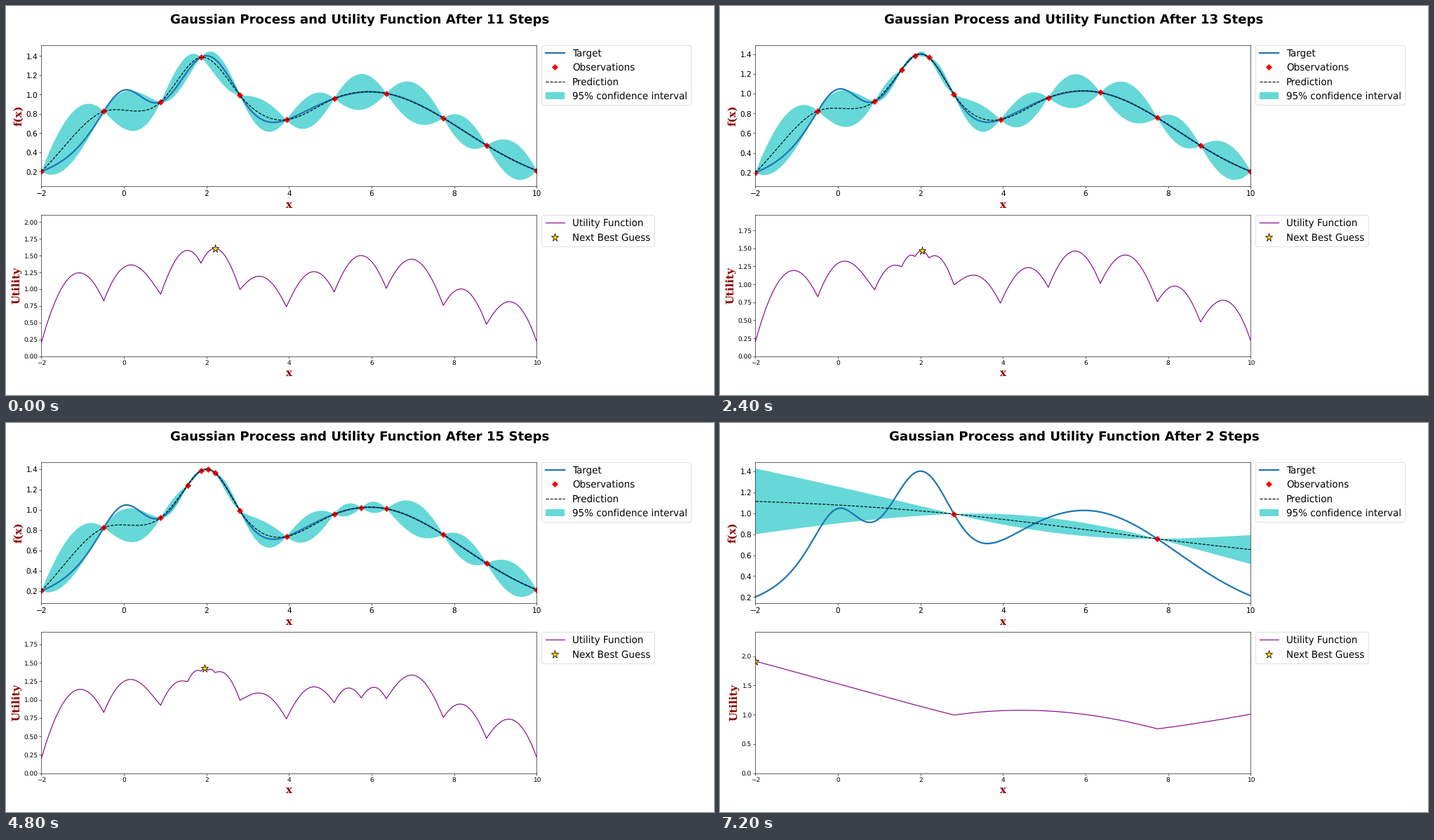
A matplotlib script for the animation above (8 s loop, 1009 px wide and 555 px high).

```python
import numpy as np
import matplotlib.pyplot as plt
from matplotlib.animation import FuncAnimation

WIDTH, HEIGHT, DPI = 1009, 555, 72  # at 72 dpi one point is one pixel
SCALE = 0.753  # pixels per nominal point
KAPPA = 5

plt.rcParams.update({
    "font.family": "DejaVu Sans", "text.hinting": "no_hinting",
    "axes.linewidth": 0.8 * SCALE, "axes.labelpad": 4 * SCALE,
    "lines.linewidth": 1.5 * SCALE, "lines.markeredgewidth": SCALE,
    "patch.linewidth": SCALE, "legend.fontsize": 18 * SCALE,
    "axes.labelsize": 20 * SCALE,
})
for side in ("xtick", "ytick"):
    plt.rcParams.update({f"{side}.major.size": 3.5 * SCALE,
                         f"{side}.major.pad": 3.5 * SCALE,
                         f"{side}.major.width": 0.8 * SCALE})

LABEL_FONT = dict(family="DejaVu Serif", weight="bold", color="darkred")

FIRST = [2.81, 7.737]
EARLY = [-2, -0.488, 0.889, 1.866, 2.81, 3.935, 5.095, 6.356, 7.737, 8.782, 10]
GUESSES = [2.203, 1.544, 2.035, 5.75, 1.96, 2.096]

grid = np.linspace(-2, 10, 2401)


def target(x):
    return np.exp(-(x - 2) ** 2) + np.exp(-(x - 6) ** 2 / 10) + 1 / (x ** 2 + 1)


def matern(a, b, length):
    """Matern kernel with nu = 1.5."""
    r = np.sqrt(3) * np.abs(a[:, None] - b[None, :]) / length
    return (1 + r) * np.exp(-r)


def factor(x, length):
    return np.linalg.cholesky(matern(x, x, length) + 1e-10 * np.eye(len(x)))


def log_likelihood(x, y, length):
    chol = factor(x, length)
    white = np.linalg.solve(chol, y)
    return -0.5 * white @ white - np.log(np.diag(chol)).sum()


def posterior(x, y):
    """Mean and deviation on the grid at the most likely length scale."""
    lengths = np.geomspace(0.5, 60, 1500)
    length = max(lengths, key=lambda s: log_likelihood(x, y, s))
    chol = factor(x, length)
    cross = np.linalg.solve(chol, matern(x, grid, length))
    mean = cross.T @ np.linalg.solve(chol, y)
    return mean, np.sqrt(np.maximum(1 - (cross ** 2).sum(axis=0), 0))


def make_step(points, guess):
    x = np.array(points, dtype=float)
    y = target(x)
    return (x, y, *posterior(x, y), guess)


steps = [make_step(EARLY + GUESSES[:k], guess) for k, guess in enumerate(GUESSES)]
steps.append(make_step(FIRST, -2))

fig = plt.figure(figsize=(WIDTH / DPI, HEIGHT / DPI), dpi=DPI, facecolor="white")


def add_panel(top, bottom, left=50.4, right=756.4):
    return fig.add_axes([left / WIDTH, 1 - bottom / HEIGHT,
                         (right - left) / WIDTH, (bottom - top) / HEIGHT])


top_ax = add_panel(55.8, 257.3)
low_ax = add_panel(298, 499.6)
title = fig.text(0.5, 1 - 25.4 / HEIGHT, "", ha="center", va="baseline",
                 fontsize=24 * SCALE, weight="bold")


def finish(ax, ylabel, tick_size):
    ax.set_xlim(-2, 10)
    ax.set_xlabel("x", fontdict=LABEL_FONT)
    ax.set_ylabel(ylabel, fontdict=LABEL_FONT)
    ax.tick_params(labelsize=tick_size * SCALE)
    ax.legend(loc="upper left", bbox_to_anchor=(1.01, 1), borderaxespad=0)


def draw(frame):
    x, y, mean, dev, guess = steps[frame // 3]
    title.set_text(f"Gaussian Process and Utility Function After {len(x)} Steps")

    top_ax.clear()
    top_ax.plot(grid, target(grid), lw=3 * SCALE, color="tab:blue", label="Target")
    top_ax.plot(x, y, "D", ms=8 * SCALE, color="r", label="Observations")
    top_ax.plot(grid, mean, "--", color="k", label="Prediction")
    top_ax.fill_between(grid, mean - 1.96 * dev, mean + 1.96 * dev, alpha=0.6,
                        fc="c", ec="none", label="95% confidence interval")
    finish(top_ax, "f(x)", 14)

    utility = mean + KAPPA * dev
    low_ax.clear()
    low_ax.plot(grid, utility, color="purple", label="Utility Function")
    low_ax.plot([guess], [np.interp(guess, grid, utility)], "*", ms=15 * SCALE,
                mfc="gold", mec="k", label="Next Best Guess")
    low_ax.set_ylim(0, utility.max() + 0.5)
    finish(low_ax, "Utility", 12)
    # Tick density is the same for both font sizes.
    low_ax.yaxis.get_major_locator().set_params(nbins=9)
    return []


anim = FuncAnimation(fig, draw, frames=20, interval=400, init_func=lambda: draw(0),
                     repeat=True, repeat_delay=0, blit=False)
plt.show()
```
